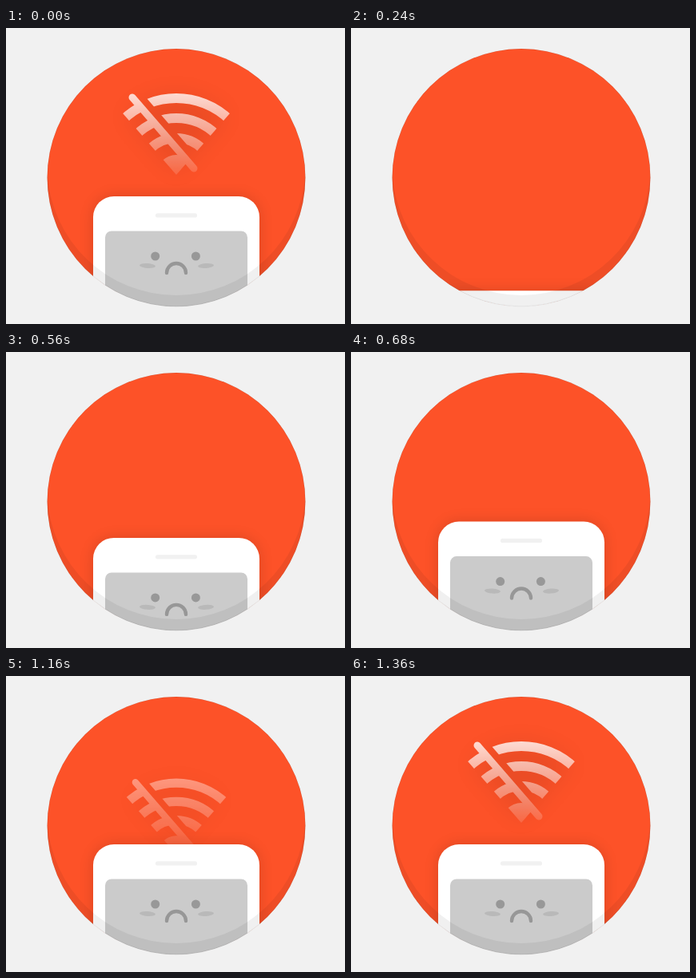
Recreate the animation shown at these times as an HTML page. Size 424 px wide and 371 px high, loop 2080 ms.

```html
<!DOCTYPE html>
<html lang="en">
<head>
<meta charset="utf-8">
<title>No connection</title>
<style>
  html, body { margin: 0; width: 100%; height: 100%; overflow: hidden; background: #f1f1f1; }
  svg { display: block; }
</style>
</head>
<body>
<svg width="424" height="371" viewBox="0 0 424 371">
  <defs>
    <clipPath id="disc"><circle cx="213" cy="187.5" r="161.8"/></clipPath>
    <clipPath id="wedge"><path d="M213 184L117.4 74H308.6Z"/></clipPath>
    <linearGradient id="fade" gradientUnits="userSpaceOnUse" x1="0" y1="82" x2="0" y2="186">
      <stop stop-color="#fff" stop-opacity=".8"/>
      <stop offset="1" stop-color="#fff" stop-opacity=".12"/>
    </linearGradient>
    <filter id="iconBlur" filterUnits="userSpaceOnUse" x="70" y="10" width="290" height="260">
      <feGaussianBlur stdDeviation="15"/>
    </filter>
    <filter id="phoneBlur" filterUnits="userSpaceOnUse" x="60" y="160" width="310" height="310">
      <feGaussianBlur stdDeviation="9"/>
    </filter>
    <mask id="wifi" maskUnits="userSpaceOnUse" x="130" y="70" width="170" height="130">
      <g clip-path="url(#wedge)" fill="none" stroke="#fff" stroke-width="12">
        <circle cx="213" cy="184" r="96"/>
        <circle cx="213" cy="184" r="71"/>
        <circle cx="213" cy="184" r="46"/>
        <circle cx="213" cy="184" r="25" fill="#fff" stroke="none"/>
      </g>
      <path d="M163 83L240 172" stroke="#000" stroke-width="13" stroke-linecap="square"/>
      <path d="M158 87L235 176" stroke="#fff" stroke-width="9" stroke-linecap="round"/>
    </mask>
  </defs>

  <circle cx="213" cy="187.5" r="161.4" fill="#fd5228"/>
  <g clip-path="url(#disc)">
    <g id="icon">
      <path d="M213 184L148 109Q213 55 278 109Z" opacity=".07" filter="url(#iconBlur)"/>
      <rect x="130" y="70" width="170" height="130" fill="url(#fade)" mask="url(#wifi)"/>
    </g>
    <g id="phone">
      <rect x="109" y="211" width="208" height="230" rx="26" opacity=".14" filter="url(#phoneBlur)"/>
      <rect x="109" y="211" width="208" height="230" rx="26" fill="#fff"/>
      <rect x="187" y="232.3" width="52" height="5.2" rx="2.6" fill="#f1f1f1"/>
      <rect x="124" y="254.5" width="178" height="170" rx="8" fill="#cbcbcb"/>
      <g fill="#989898">
        <circle cx="186.7" cy="286" r="5.5"/>
        <circle cx="237.4" cy="286" r="5.5"/>
      </g>
      <g fill="#b9b9b9">
        <ellipse cx="177" cy="298" rx="10" ry="3" transform="rotate(4 177 298)"/>
        <ellipse cx="250" cy="298" rx="10" ry="3" transform="rotate(-4 250 298)"/>
      </g>
      <path d="M201 307A12 12 0 0 1 225 307" fill="none" stroke="#979797" stroke-width="4.4" stroke-linecap="round"/>
    </g>
    <path d="M51.75 180.5A161.4 161.4 0 1 0 374.25 180.5A161.4 161.4 0 0 1 51.75 180.5Z" opacity=".06"/>
    <circle cx="213" cy="187.5" r="161.4" fill="none" stroke="#000" stroke-opacity=".12" stroke-width=".8"/>
  </g>
</svg>
<script>
  const LOOP = 2080, STEP = 40, INTRO = 80;
  const icon = document.getElementById('icon');
  const phone = document.getElementById('phone');

  const ease = (t, start, end) => {
    const p = Math.min(1, Math.max(0, (t - start) / (end - start)));
    return p * p * (3 - 2 * p);
  };
  const mix = (a, b, p) => a + (b - a) * p;

  function draw(now) {
    let t = Math.floor((now % LOOP) / STEP) * STEP;
    if (t < INTRO) t = LOOP; // the loop opens on the finished pose

    const rise = ease(t, 80, 720);
    phone.setAttribute('transform', `translate(0 ${mix(140, 0, rise)})`);

    const pop = ease(t, 960, 1360);
    icon.setAttribute('opacity', pop);
    icon.setAttribute('transform',
      `translate(213 ${mix(219, 133, pop)}) scale(${mix(.86, 1, pop)}) translate(-213 -133)`);
  }

  function tick() {
    draw(performance.now());
    requestAnimationFrame(tick);
  }
  tick();
</script>
</body>
</html>
```
